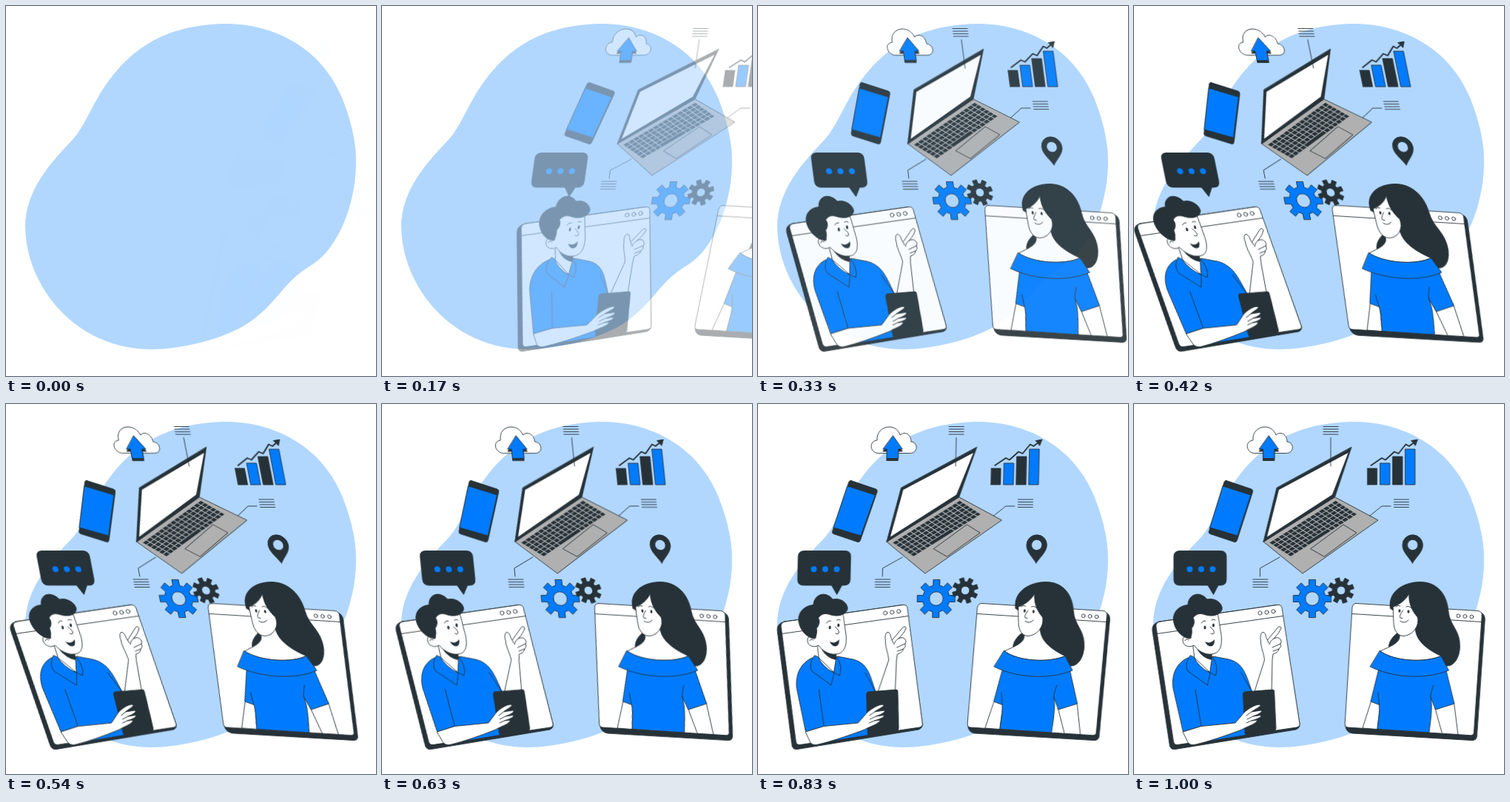
Write an HTML page that moves like this. It is 500 px wide and 500 px high and loops after 1040 ms.

```html
<!DOCTYPE html>
<html lang="en">
<head>
<meta charset="utf-8">
<title>Video call</title>
<style>
  html, body { margin: 0; width: 100%; height: 100%; overflow: hidden; background: #fff; }
  svg { display: block; width: 100%; height: 100%; overflow: hidden; }
  .part {
    transform-box: fill-box;
    transform-origin: center;
    stroke: #263238;
    stroke-width: .9;
    stroke-linecap: round;
    stroke-linejoin: round;
    animation: arrive 1040ms infinite;
  }
  .dark { fill: #263238; }
  .blue { fill: #007bff; }
  .white { fill: #fff; }
  .line { fill: none; }
  .flat { stroke: none; }

  /* Slide in leaning, lean past upright, then settle */
  @keyframes arrive {
    0% {
      transform: translateX(247.85px) skewX(-19.74deg);
      opacity: .0086;
      animation-timing-function: cubic-bezier(.34, .117, .499, 1.364);
    }
    54.67% {
      transform: translateX(0) skewX(10deg);
      opacity: 1;
      animation-timing-function: cubic-bezier(.36, -.01, .5, 1.38);
    }
    73.9% {
      transform: translateX(0) skewX(-2deg);
      opacity: 1;
      animation-timing-function: cubic-bezier(.36, -.01, .5, 1.38);
    }
    93.13%, 100% { transform: translateX(0) skewX(0deg); opacity: 1; }
  }
</style>
</head>
<body>
<svg viewBox="0 0 500 500">
  <defs>
    <path id="note" d="M0 0h20M0 3.500h20M0 7h20M0 10.500h20"/>
  </defs>

  <path fill="#b1d7ff" d="M296 24C371 24 430 64 454.500 125C467 157 474 186 473 215C472 268 449 328 413 350C371 375 368 402 325 430C290 452 232 464 197 464C95 464 27 380 26 298C26 252 57 215 86.500 184.500C109 162 116 128 146.500 91C190 38 244 25 296 24Z"/>

  <g transform="translate(-1.200 0)">
    <!-- Cloud upload -->
    <g class="part">
      <path class="white" d="M163 66.500C152 65 151 50 162 49C161 38 169 31 178 31C186 31 191 36 193 42C199 36 208 41 208 51C218 52 218 66.500 207 66.500Z"/>
      <path class="dark" d="M183.500 46L196.500 64H191V76.500H175.500V64H170.500Z"/>
      <path class="blue" d="M183.500 43L196.500 61H191V73.500H175.500V61H170.500Z"/>
    </g>

    <!-- Chart -->
    <g class="part">
      <path class="dark" d="M316.500 87h13v22h-13zM351 71h13v38h-13z"/>
      <path class="blue" d="M334 80h13v29h-13zM368 61h13v48h-13z"/>
      <path class="line" stroke-width="1.800" d="M321.500 83L336 73L341 75.500L353 64.500L358.500 67L368.500 54.500L373 57L381 51"/>
      <path class="dark" d="M376 49.500L384.500 48L381.500 56Z"/>
    </g>

    <!-- Phone -->
    <g class="part">
      <path class="dark" d="M126 103.500L160 115Q162.500 116 161.500 119L140.500 184Q139.500 187 137 186.500L104 175.500Q101.500 174.500 102.500 172L123 105.500Q124 103 126 103.500Z"/>
      <path class="blue" d="M121.500 111L159 123L141 178L104 167Z"/>
    </g>

    <!-- Laptop and notes -->
    <g class="part">
      <path fill="#b0b0b0" d="M272 125.500L331 157L229 229L176 186Z"/>
      <path class="dark" d="M295 58.500L272.500 126L176 186.500L194 113.500Z"/>
      <path class="white flat" d="M290.500 66L269 122.500L181 179.500L197 116Z"/>
      <g class="line" transform="matrix(.99 -.63 1 .64 184.500 187.500)" stroke-width="4" style="stroke-linecap:butt">
        <path stroke-dasharray="5 1.100" d="M0 2h90M0 6.900h90M0 11.800h90M0 16.700h90M0 21.600h90"/>
        <path stroke-dasharray="5 1.100 5 1.100 5 1.100 5 1.100 30 1.100 5 1.100 5 1.100 5 1.100 5 1.100 5 1.100" d="M0 26.500h90"/>
      </g>
      <path class="line" d="M240 195.500L284 163L302 174L258.500 206Z"/>
      <use href="#note" x="257" y="30.500"/>
      <use href="#note" x="352.500" y="129"/>
      <use href="#note" x="162" y="237"/>
      <path class="line" d="M267 45.500V84M348 138H336L320 151M171.500 233V222L198 207"/>
    </g>

    <!-- Speech bubble -->
    <g class="part">
      <path class="dark" d="M63 198.500H118Q126 198.500 126 206V237Q126 245 118 245H115L108.500 257.500L101 245H63Q55 245 55 237V206Q55 198.500 63 198.500Z"/>
      <path class="line" style="stroke:#007bff" stroke-width="8" d="M76.500 223.300h.01M92 223.300h.01M107.500 223.300h.01"/>
    </g>

    <!-- Gears -->
    <g class="part" id="gears" fill-rule="evenodd"></g>

    <!-- Map pin -->
    <g class="part">
      <path class="dark" fill-rule="evenodd" d="M377.500 215C372 206 364 200 364 190.500A13.700 13.700 0 0 1 391.400 190.500C391.400 200 383 206 377.500 215ZM370.500 190.500A7.200 7.200 0 0 0 384.900 190.500A7.200 7.200 0 0 0 370.500 190.500Z"/>
    </g>

    <!-- Man -->
    <g class="part">
      <path class="dark" d="M35 294L194 271.500Q199 271 200 276L225 432Q226 437.500 220 440L57 466.500Q51 467.500 49.500 462L26 306Q25 297 35 294Z"/>
      <path class="white" d="M37 294L195 271.500Q200 271 201 275L225 432Q225.500 436 221 437L60 460.500Q55.500 461 54.500 456L31 301Q30 295 37 294Z"/>
      <path class="line" d="M32 310.500L202.500 286.500"/>
      <g class="line">
        <circle cx="171.500" cy="282.500" r="2.600"/><circle cx="180.500" cy="281.500" r="2.600"/><circle cx="189.500" cy="280.300" r="2.600"/>
      </g>
      <path class="white" d="M162 395L177.500 346C177 338 172 328 172.500 320C171 313 173 308 176 308.500C180 310 179 316 181.500 319L195.500 302Q199 299 200 303Q198 309 190 317Q196 314 199 318Q201.500 321 199 324Q201 328 197 331Q196 336 189 338L188 346L187 395Z"/>
      <path class="line" d="M190 317Q185 320 184 325M199 324L188 329M197 331L189 334M181.500 319L183 323"/>
      <path class="blue" d="M74 343C63 348 51 360 54 384L67.500 443L92 435.500L78 459.500L152 447.500L150 390L160.500 388C153 368 150 350 129 345L108 341L100 365Z"/>
      <path class="line" d="M84 386L92 435.500M146 363L160 388"/>
      <path class="white" d="M80 322L83 343L104 363L107 345L105 333Z"/>
      <path class="dark flat" d="M86 331Q96 338 106.500 337L106 346Q94 344 86 331Z"/>
      <path class="white" d="M76 292C84 276 104 278 114 282C116 292 117 300 118 306C121.500 323 119 337 106 338C97 339 88 334 82 326C76 330 67 327 67 319C67 313 74 311 78 316Z"/>
      <path class="dark" d="M72 316C60 312 52 296 55 286C57 277 66 272 74 271.500C74 261 84 254 93 258.500C97 260 98 262 100 264C112 261 122 271 120 278C117 286 106 287.500 98 285C91 282.500 86 282.500 81 289C84 294 82 300 79 303C80 309 79 313 77 317Z"/>
      <path class="dark flat" d="M97 321Q104 325 110 318Q110.500 327.500 104.500 327.500Q100 327 97 321Z"/>
      <g class="dark flat">
        <ellipse cx="97" cy="302" rx="1.500" ry="2.600"/><ellipse cx="108.500" cy="299" rx="1.500" ry="2.600"/>
      </g>
      <path class="line" d="M92 296Q95 292 98 293M106 292Q109 290 111 292M104 301Q111 307 109 310Q107 312 105 310M70 320Q72 316 75 319"/>
      <path class="blue" d="M77 340C71 348 71 356 74 361L100.500 380L104 363.500Q88 355 82 342ZM107 341.500Q116 354 111.500 367L104 363Z"/>
      <path class="dark" d="M151 389L188.500 386Q190.500 386 190.700 388L193 438Q193 441 190.500 441.500L154 447Q151.500 447 151.200 444.500L148.500 392Q148.500 389.500 151 389Z"/>
      <path class="white" d="M67.500 443L92 435.500L138 431L150 417C156 411 168 404.500 172 406.500C173 409 165 412 160 416L173 414Q176 417 162 422L173 420.500Q174 424 160 428L168 427C166 433 155 435 147 440Q110 454 85 460Q78 462 74.500 458Z"/>
      <path class="line" d="M160 416L153 421M162 422L154 426M160 428L153 431"/>
    </g>

    <!-- Woman -->
    <g class="part">
      <path class="dark" d="M301 271L469 281.500Q476 284 475.300 292L464.500 449Q464 455 457 454.500L296 445Q288 443.500 287 436Z"/>
      <path class="white" d="M302 269.500L466 279.500Q472 280.500 471.300 286L460.500 444Q460 448 455.500 447.700L290 437Q286 436.500 286.200 432L296 275Q297 269 302 269.500Z"/>
      <path class="line" d="M296 283.500L471 294.500"/>
      <g class="line">
        <circle cx="439.500" cy="286.300" r="2.400"/><circle cx="448.500" cy="286.900" r="2.400"/><circle cx="457.500" cy="287.500" r="2.400"/>
      </g>
      <path class="dark" d="M347.500 276C344 254 365 240.500 388 240.500C410 240.500 424 256 426 280C428 300 442 305 441.500 328C441 343 434 354 424 354C400 350 375 335 368 322L346 334C343 322 352 313 359 308L353 280Z"/>
      <path class="white" d="M321.500 402L310 438L330 439.500L334 404ZM408 411L417.500 445.300L439 446.500L433.500 403Z"/>
      <path class="white" d="M360 312.500C362 323 346 328 334 334C352 348 395 350 416 340.500C402 334 382 322 381.500 304Z"/>
      <path class="white" d="M351.500 274C358 272 368 266 373 256C372 272 379 282 384 287C388 299 378 313 365 313.500C356 313 352 304 352 295Z"/>
      <path class="dark flat" d="M373 256C371 270 380 284 384 288L390 262Z"/>
      <path class="blue" d="M332 358L321 402L332.500 406.500C334 415 331 428 330 439.300L400 444C402 427 405 410 402 396L408.500 413L434 405L423 360Z"/>
      <path class="line" d="M332.500 406.500L331 390M402 396Q402 390 406 380"/>
      <path class="blue" d="M333.500 333.500C352 348 395 350 416 340.500L426.500 360C395 373 350 370 320.500 355Z"/>
      <g class="dark flat">
        <ellipse cx="360" cy="279.500" rx="1.400" ry="2.200"/><ellipse cx="372" cy="280.500" rx="1.400" ry="2.200"/>
      </g>
      <path class="line" d="M355 274Q358 271 361 273M369 274Q373 272 376 276M364.500 279Q359 287 361 289L364 289.500M361 293.500Q367 297.500 372 292"/>
    </g>
  </g>
</svg>
<script>
  // Eight-toothed wheel with a round hole
  function gear(cx, cy, outer, root, hole, turn, cls) {
    const pts = [];
    for (let i = 0; i < 8; i++) {
      for (const [r, off] of [[root, -14], [outer, -10], [outer, 10], [root, 14]]) {
        const a = (i * 45 + turn + off) * Math.PI / 180;
        pts.push((cx + r * Math.cos(a)).toFixed(2) + ' ' + (cy + r * Math.sin(a)).toFixed(2));
      }
    }
    const arc = `a${hole} ${hole} 0 0 0 `;
    return `<path class="${cls}" d="M${pts.join('L')}ZM${cx - hole} ${cy}${arc}${2 * hole} 0${arc}${-2 * hole} 0Z"/>`;
  }
  document.getElementById('gears').innerHTML =
    gear(242, 263, 26, 18.5, 9.3, 0, 'blue') + gear(281, 252, 17.5, 12, 5.8, -18, 'dark');
</script>
</body>
</html>
```
